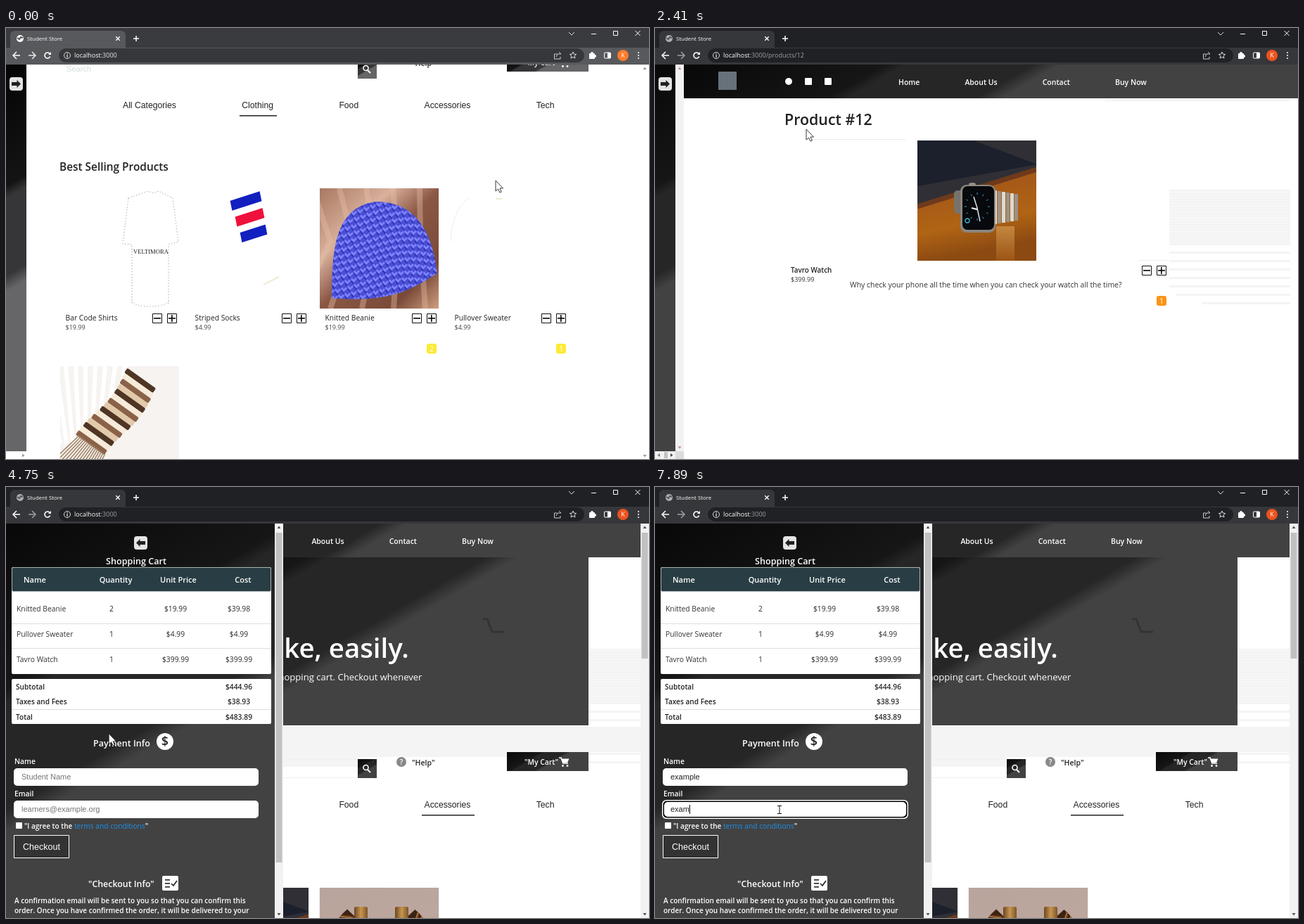
Animation, 914 px wide and 613 px high, one loop 8000 ms. Source, as an HTML page with a canvas:

```html
<!DOCTYPE html>
<html lang="en">
<head>
<meta charset="utf-8">
<title>Student Store</title>
<style>
html, body { margin: 0; width: 100%; height: 100%; overflow: hidden; background: #fff; }
canvas { display: block; width: 100vw; height: 100vh; }
</style>
</head>
<body>
<canvas id="stage" width="914" height="613"></canvas>
<script>
const ctx = document.getElementById('stage').getContext('2d');
const SANS = '"Open Sans", "Noto Sans", sans-serif';
const ARIAL = '"Liberation Sans", sans-serif';
const SERIF = '"Liberation Serif", serif';
const LOOP = 8000, SCROLL = 342;
const CLICK = { category: 420, product: 1170, add: 2140, home: 3190, cart: 3959, name: 5020, email: 7230 };

// Pointer journeys: start, end, destination, look on arrival
const JOURNEYS = [
  [60, 400, 642, 105, 'hand'], [620, 1020, 342, 333, 'hand'], [1170, 1710, 715, 341, 'hand'],
  [2080, 2410, 215, 144, 'arrow'], [2560, 3040, 355, 78, 'hand'], [3310, 3720, 15, 77, 'arrow'],
  [4210, 4870, 175, 411, 'beam'], [6900, 7230, 177, 459, 'beam']];
const CART = [['Knitted Beanie', '2', '$19.99', '$39.98'], ['Pullover Sweater', '1', '$4.99', '$4.99'],
  ['Tavro Watch', '1', '$399.99', '$399.99']];
const CLOTHES = [['Bar Code Shirts', '$19.99', shirt], ['Striped Socks', '$4.99', socks],
  ['Knitted Beanie', '$19.99', beanie, '2'], ['Pullover Sweater', '$4.99', sweater, '1'], ['', '', scarf]];
const ACCESSORIES = [['Matching Rings', '$200.00', rings], ['Tavro Watch', '$399.99', watch],
  ['Copper Bracelet', '$70.00', bracelet]];

const progress = (t, start, end) => Math.min(1, Math.max(0, (t - start) / (end - start)));
const smooth = k => k * k * (3 - 2 * k);
const typed = (word, t, start, end, bend) =>
  t < start ? '' : word.slice(0, 1 + Math.floor((word.length - 1) * progress(t, start, end) ** bend));

function box(x, y, w, h, fill, r = 0, stroke) {
  ctx.beginPath();
  ctx.roundRect(x, y, w, h, r);
  if (fill) { ctx.fillStyle = fill; ctx.fill(); }
  if (stroke) { ctx.strokeStyle = stroke; ctx.lineWidth = 1; ctx.stroke(); }
}
function trace(points) {
  ctx.beginPath();
  points.forEach(([x, y]) => ctx.lineTo(x, y));
}
function poly(points, fill) { trace(points); ctx.fillStyle = fill; ctx.fill(); }
function line(points, color, width = 1) {
  trace(points);
  ctx.strokeStyle = color; ctx.lineWidth = width; ctx.stroke();
}
function oval(x, y, rx, ry, fill, stroke, width = 1, a = 0, b = 2 * Math.PI, tilt = 0) {
  ctx.beginPath();
  ctx.ellipse(x, y, rx, ry, tilt, a, b);
  if (fill) { ctx.fillStyle = fill; ctx.fill(); }
  if (stroke) { ctx.strokeStyle = stroke; ctx.lineWidth = width; ctx.stroke(); }
}
// y is the middle of the capitals
function text(str, x, y, size, color = '#222', weight = 400, align = 'left', font = SANS) {
  ctx.font = `${weight} ${size}px ${font}`;
  ctx.textAlign = align;
  ctx.fillStyle = color;
  ctx.fillText(str, x, y + size * .36);
  return ctx.measureText(str).width;
}
function menu(labels, x, gap, ...style) {
  for (const label of labels) x += gap + text(label, x, ...style);
}
function within(x, y, w, h, dx, dy, draw) {
  ctx.save();
  ctx.beginPath(); ctx.rect(x, y, w, h); ctx.clip();
  ctx.translate(dx, dy);
  draw();
  ctx.restore();
}
function blend(x0, y0, x1, y1, ...stops) {
  const g = ctx.createLinearGradient(x0, y0, x1, y1);
  stops.forEach(([p, c]) => g.addColorStop(p, c));
  return g;
}
// Black to grey in diagonal bands
function dark(x, y, w, h, washed) {
  const len = w * .5 + h * .866;
  const [a, b, c, d] = washed ? ['#040404', '#141414', '#363638', '#666668']
    : ['#080808', '#161616', '#262626', '#424242'];
  box(x, y, w, h, blend(x, y, x + len * .5, y + len * .866,
    [0, a], [.3, b], [.33, c], [.52, c], [.56, d], [1, d]));
}
function cartIcon(x, y, color) {
  line([[x, y], [x + 3, y], [x + 6, y + 8], [x + 13, y + 8]], color, 1.7);
  poly([[x + 3, y + 1.5], [x + 14.5, y + 1.5], [x + 12, y + 7], [x + 6, y + 7]], color);
  for (const dx of [5.5, 12]) oval(x + dx, y + 11.5, 1.4, 1.4, color);
}

// Product pictures, drawn in a 170 x 171 box
function rings() {
  const glow = ctx.createRadialGradient(85, 110, 10, 85, 90, 115);
  glow.addColorStop(0, '#4a2c26'); glow.addColorStop(.6, '#26161a'); glow.addColorStop(1, '#0d080a');
  box(0, 0, 170, 171, glow);
  for (const [x, y, tilt] of [[63, 78, -.1], [102, 73, .45]]) {
    oval(x, y + 4, 24, 20, null, '#6b503c', 7, 0, 7, tilt);
    oval(x, y, 23, 19, null, '#c9ad91', 5, 0, 7, tilt);
    oval(x, y + 4, 25, 20, null, '#f4e6d2', 3, .6, 2.8, tilt);
  }
}
function watch() {
  box(0, 0, 170, 171, blend(0, 70, 20, 171, [0, '#a3561a'], [.6, '#b06414'], [1, '#8c4a12']));
  poly([[0, 0], [170, 0], [170, 38], [0, 92]], '#302f35');
  poly([[0, 0], [80, 0], [170, 34], [0, 65]], '#1b202c');
  line([[0, 94], [170, 41]], '#6e3a1b', 7);
  box(112, 122, 26, 49, blend(0, 122, 0, 171, [0, '#c4873f'], [1, '#9c5414']));
  box(52, 71, 14, 33, '#77736c', 5);
  for (let i = 0; i < 6; i++) box(108 + i * 6, 71 + i, 5, 48 - i * 2, i % 2 ? '#98938a' : '#dedad0', 1);
  box(61, 63, 50, 68, '#8b8780', 9);
  box(64, 65, 45, 62, '#07090d', 7);
  oval(78, 62, 5, 2, '#9a8f88');
  for (let i = 0; i < 12; i++) {
    const a = i * Math.PI / 6, c = Math.cos(a), s = Math.sin(a);
    line([[85 + c * 15, 94 + s * 17], [85 + c * 18, 94 + s * 20]], '#3f9fd0');
  }
  line([[80, 80], [85, 96], [89, 115]], '#d9e4e8', 1.5);
  line([[77, 96], [85, 98]], '#fff', 2);
  oval(71, 114, 3, 3, null, '#3fb6d0', 1.3);
}
function bracelet() {
  box(0, 0, 170, 171, blend(0, 0, 60, 171, [0, '#b9a49d'], [.6, '#bda79e'], [1, '#a38e89']));
  const p = (a, side) => {
    const spread = side * (13 + 10 * Math.max(0, Math.sin(a)));
    return [87 + Math.cos(a) * (56 + spread), 72 + Math.sin(a) * (44 + spread)];
  };
  for (let a = -.75; a < 3.9; a += .05) line([p(a, -1), p(a, 1)], '#3e2311', 6);
  for (let a = -.7; a < 3.8; a += .13) {
    line([p(a, -1), p(a + .16, 0), p(a, 1)], '#a9713f', 2.2);
    line([p(a + .05, -.9), p(a + .2, 0), p(a + .05, .9)], '#6b3d1c', 1.6);
  }
  for (const x of [49, 107]) box(x, 27, 19, 38, blend(x, 0, x + 19, 0, [0, '#6d4622'], [.5, '#c69650'], [1, '#7d5429']), 2);
}
function shirt() {
  ctx.setLineDash([1, 3]);
  line([[97, 14], [125, 4], [132, 7], [140, 4], [160, 14], [168, 76], [154, 80], [154, 165]], '#888');
  oval(128, 160, 26, 8, null, '#888', 1, 0, Math.PI);
  line([[102, 163], [102, 80], [89, 79], [97, 14]], '#888');
  ctx.setLineDash([]);
  text('VELTIMORA', 129, 90, 8.6, '#222', 400, 'center', SERIF);
}
function socks() {
  ['#1220bf', '#f0103c', '#1220bf'].forEach((color, i) => {
    ctx.save();
    ctx.translate(80 + i * 6, 18 + i * 23);
    ctx.transform(1, -.32, .2, 1, 0, 0);
    box(-21 + i, -7, 42 - i * 3, 14, color);
    ctx.restore();
  });
  line([[105, 137], [127, 126]], '#f1ead8', 2);
}
function beanie() {
  box(0, 0, 170, 171, blend(0, 0, 170, 171, [0, '#a87862'], [.3, '#d9b19c'], [.5, '#8b5745'], [.8, '#7a4a38'], [1, '#d0a080']));
  for (let i = 0; i < 6; i++) line([[-10 + i * 38, 0], [15 + i * 32, 75], [-30 + i * 45, 171]], '#e6bda566', 8);
  ctx.beginPath();
  ctx.moveTo(17, 156);
  ctx.bezierCurveTo(18, 95, 18, 25, 82, 19);
  ctx.bezierCurveTo(135, 20, 160, 60, 167, 121);
  ctx.bezierCurveTo(135, 140, 105, 164, 17, 156);
  ctx.fillStyle = '#4a4fd6'; ctx.fill();
  ctx.clip();
  for (let row = 0; row < 17; row++) for (let i = 0; i < 20; i++) {
    const x = i * 9 + (row % 2) * 4, y = 8 + row * 9.5 + 14 * Math.cos(x / 40);
    line([[x, y], [x + 3, y + 4], [x + 7, y]], '#7f84ff', 2.6);
    line([[x, y + 4], [x + 3, y + 8]], '#2f33a8', 1.8);
  }
}
function sweater() {
  oval(40, 80, 38, 70, null, '#eee', 1, 3.2, 4.4);
  line([[66, 15], [76, 15]], '#dcd9b0');
}
function scarf() {
  box(0, 0, 170, 171, '#f6f3f1');
  for (let i = 0; i < 9; i++) line([[i * 14 - 20, 0], [i * 9, 110]], '#fff', 6);
  const tones = ['#4f3524', '#f6ead8', '#8a6248', '#e2c9a9'];
  ctx.translate(120, 20);
  ctx.rotate(.62);
  for (let i = 0; i < 15; i++) box(-30 + 5 * Math.sin(i / 3), i * 8, 50, 8, tones[i % 4], 2);
  for (let i = 0; i < 16; i++) line([[-30 + i * 3, 118], [-38 + i * 4, 160]], '#a5876a', 1.6);
}

function browser(washed, path) {
  const grey = washed ? '#e8e8e8' : '#9aa0a6', bar = washed ? '#58595c' : '#36373a';
  box(0, 0, 914, 30, washed ? '#3a3b3e' : '#202124');
  box(6, 4, 164, 30, bar, 6);
  box(0, 28, 914, 24, bar);
  box(75, 29, 747, 20, washed ? '#36373a' : '#202124', 10);
  oval(20, 15, 5, 5, washed ? '#fff' : '#aab0b5');
  line([[16, 14], [19, 16], [21, 13], [24, 14]], '#55585c', 2);
  text('Student Store', 30, 15, 7.9, '#fff');
  const cross = (x, y, r, width) => {
    line([[x - r, y - r], [x + r, y + r]], '#fff', width);
    line([[x + r, y - r], [x - r, y + r]], '#fff', width);
  };
  cross(159, 15, 2.7, 1.3);
  cross(898, 7.5, 3.5, 1);
  box(181, 14.3, 8, 1.5, '#fff'); box(184.3, 11, 1.5, 8, '#fff');
  line([[800, 6], [804, 10], [808, 6]], '#ddd');
  box(832, 8, 7, 1, '#fff');
  box(863.5, 4.5, 6, 6, null, 0, '#fff');
  for (const [x, d, c] of [[15, 1, '#fff'], [37, -1, grey]]) {
    line([[x - 5 * d, 39], [x + 5 * d, 39]], c, 1.5);
    line([[x, 34], [x - 5 * d, 39], [x, 44]], c, 1.5);
  }
  oval(59, 39, 4, 4, null, '#fff', 1.6, .4, 5.7);
  poly([[60, 38], [64, 38], [64, 34]], '#fff');
  oval(87, 39, 4.5, 4.5, null, '#ddd');
  box(86.4, 38, 1.3, 4, '#ddd'); box(86.4, 36, 1.3, 1.3, '#ddd');
  const host = text('localhost', 97, 39, 9, '#fff');
  text(':3000' + path, 97 + host, 39, 9, grey);
  line([[783, 37], [779.5, 37], [779.5, 44], [788, 44], [788, 41]], '#ccc');
  line([[782, 41], [784, 37], [789, 37], [786, 34]], '#ccc');
  line(Array.from({ length: 11 }, (_, i) => {
    const r = i % 2 ? 2.3 : 5, a = i * Math.PI / 5 - Math.PI / 2;
    return [806 + r * Math.cos(a), 39 + r * Math.sin(a)];
  }), '#ddd');
  box(829, 36, 8, 8, '#fff', 1); oval(833, 36, 2, 2, '#fff'); oval(837, 40, 2, 2, '#fff');
  box(850.5, 35, 9, 8, null, 1, '#fff'); box(855, 35, 4, 8, '#fff');
  oval(877, 39, 8, 8, washed ? '#ff7a2a' : '#ed531f');
  text('K', 877, 39, 9, '#fff', 400, 'center');
  for (const y of [35, 39, 43]) oval(899, y, 1, 1, '#fff');
}
function tip(x, y, dx, dy, color) {
  poly([[x + dx * 2.5, y + dy * 2.5], [x - dx - dy * 2.5, y - dy - dx * 2.5], [x - dx + dy * 2.5, y - dy + dx * 2.5]], color);
}
function scrollbar(x, bottom, top, end) {
  box(x, 52, 12, bottom - 52, '#f3f2f2');
  if (end) box(x + 1.5, top, 9, end - top, '#c1c1c1');
  tip(x + 6, 58, 0, -1, end ? '#505050' : '#b99');
  tip(x + 6, bottom - 6, 0, 1, end ? '#505050' : '#b99');
}
function navBar(shift, right) {
  dark(41, 52, right - 41, 48);
  box(84 + shift, 62, 26, 26, '#66717a');
  oval(184 + shift, 76, 5, 5, '#fff');
  for (const x of [207, 235]) box(x + shift, 71, 10, 10, '#fff', 1);
  menu(['Home', 'About Us', 'Contact', 'Buy Now'], 340 + shift, 64, 77, 10.5, '#fff', 600);
}
function stepper(x, y, count, color) {
  for (const dx of [0, 21]) {
    box(x + dx + .5, y + .5, 13, 13, '#fff', 0, '#111');
    box(x + dx + 2, y + 6, 10, 1.7, '#111');
  }
  box(x + 27, y + 2, 1.7, 10, '#111');
  if (count) {
    box(x + 21, y + 43, 14, 14, color, 3);
    text(count, x + 28, y + 50, 10.5, '#fff', 400, 'center');
  }
}
function paleBands(left) {
  for (let y = 230; y < 400; y += y < 306 ? 4 : 12) {
    const x = Math.max(left, 632 + (y - 300) ** 2 / 56);
    box(x, y, 903 - x, y < 306 ? 3.5 : 3, '#f4f4f4');
  }
}
function storeHead() {
  paleBands(828);
  box(184, 341, 719, 36, '#f4f4f4');
  box(184, 341, 528, 43, '#f4f4f4');
  box(184, 341, 316, 57, '#f4f4f4');
  dark(76, 100, 752, 239);
  line([[678, 188], [684, 188], [691, 206], [708, 206]], '#333', 3);
  text('Welcome!', 103, 174, 38.4, '#fff', 600);
  text('Find what you like, easily.', 103, 229, 38.4, '#fff', 600);
  text('Look for things you like to start filling up your shopping cart. Checkout whenever', 103, 270, 13.05, '#fff');
  text("you're ready.", 103, 288.5, 13.05, '#fff');
}
function storeAbout() {
  box(76, 823, 827, 300, '#f4f4f4');
  box(827, 913, 76, 200, '#fff');
  text('About', 76, 882, 15.6, '#222', 600);
  text('The student store offers great products at great prices to all', 100, 956, 10.4, '#555');
  dark(476, 913, 351, 200);
}
function store(washed, scroll, items, t) {
  within(29, 52, 885, 561, 0, -scroll, () => {
    if (!scroll) storeHead();
    else if (!washed) {
      ctx.save(); ctx.translate(0, scroll);
      paleBands(632);
      ctx.restore();
    }
    if (!washed) {
      box(76.5, 387.5, 424, 26, null, 4, '#f0f0f0');
      for (const y of [450, 454, 458]) box(78, y, 12, 1, '#777');
      oval(562, 391, 7, 7, '#888');
      text('?', 562, 391, 10, '#fff', 600, 'center');
    }
    text('Search', 86, 400.5, 11.1, washed ? '#cfdcd8' : '#777', 400, 'left', ARIAL);
    dark(500, 387, 27, 27, washed);
    oval(511.5, 399, 3.5, 3.5, null, '#fff', 1.6); line([[514, 402], [518, 406]], '#fff', 2);
    text('"Help"', 577, 392, 10.5, '#222', 600);
    dark(712, 377, 116, 27, washed);
    text('"My Cart"', 737, 391.5, 10.3, '#fff', 600);
    cartIcon(786, 385, '#fff');
    menu(['All Categories', 'Clothing', 'Food', 'Accessories', 'Tech'], 166, 93.4, 451.5, 12.2, '#222', 400, 'left', ARIAL);
    const settled = t >= CLICK.category + 240;
    if (!settled) box(332, 466, 53, 1.5, '#222');
    if (!washed) box(591, 466, 75, 1.5, settled ? '#222' : '#a8938f');
    text('Best Selling Products', 76, 539, 15.4, '#222', 600);
    items.forEach(([label, price, picture, count], i) => {
      const x = Math.round(76.6 + (i % 4) * 184.6), y = 570 + Math.floor(i / 4) * 253;
      if (!washed) box(x - .5, y, 170, 238.5, '#fff', 0, '#f2f2f2');
      within(x, y, 169, 171, x, y, picture);
      if (!label) return;
      text(label, x + 7.5, y + 184, washed ? 10.3 : 9.9, '#222', washed ? 400 : 600);
      text(price, x + 7.5, y + 197.5, 9, '#444');
      stepper(x + 131, y + 178, count, '#fdea35');
    });
    if (!washed && scroll) storeAbout();
  });
}
function productPage(t) {
  paleBands(731);
  navBar(6, 914);
  box(216, 158, 140, 1, '#ebebeb'); box(640, 103, 262, 1, '#efefef'); box(687, 330, 43, 1, '#eee');
  text('Product #12', 184, 130.5, 21.4, '#222', 600);
  within(373, 160, 169, 171, 373, 160, watch);
  text('Tavro Watch', 193, 344, 9.9, '#222', 600);
  text('$399.99', 193, 357.5, 9, '#333');
  stepper(692, 338, t >= CLICK.add && '1', '#fb9416');
  text('Why check your phone all the time when you can check your watch all the time?', 277, 365, 10.45, '#333');
}

function arrowButton(x, dir) {
  box(x - 9, 70, 19, 19, '#e4e4e4', 4);
  box(x - (dir > 0 ? 6 : 1), 77, 8, 5, '#222');
  poly([[x + .5 + 6.5 * dir, 79.5], [x + .5 + dir, 74], [x + .5 + dir, 85]], '#222');
}
function field(y, w, value, hint, focus, caret) {
  if (focus) { box(10, y - 1, w + 2, 27, '#fff', 6); box(11.5, y + .5, w - 1, 24, '#000', 5); }
  box(focus ? 13 : 11, y + (focus ? 2 : 0), w - (focus ? 4 : 0), focus ? 21 : 25, '#fff', 5);
  const width = text(value || hint, 22, y + 12, 11, value ? '#222' : '#757575', 400, 'left', ARIAL);
  if (focus && caret) box(22 + (value ? width : 0), y + 6, 1, 13, '#000');
}
function suggestions(y, w, items) {
  box(79, y, w, items.length * 31, '#282a2e', 3);
  items.forEach((item, i) => text(item, 87, y + 15.5 + i * 31, 8.4, '#f2f2f2'));
}
function sidebar(open, t) {
  const w = 29 + open * 353, wide = open > .9, narrow = open < .1, washed = t < CLICK.category;
  const bottom = wide ? 613 : 602;
  within(0, 52, w, bottom - 52, 0, 0, () => {
    dark(0, 52, w, 561, washed);
    arrowButton(Math.floor(w / 2), narrow ? 1 : -1);
    if (!narrow) cartPanel(wide, t);
  });
  if (washed) { box(0, 602, 41, 11, '#fff'); tip(24, 608, 1, 0, '#999'); return; }
  scrollbar(w, bottom, 65, narrow ? 0 : wide ? 534 : 481);
  if (wide) return;
  box(0, 602, w, 11, '#f1f1f1');
  box(13, 603, narrow ? 5 : w - 29, 9, '#c1c1c1');
  tip(6, 607.5, -1, 0, '#777'); tip(w - 6, 607.5, 1, 0, '#444');
  box(w, 602, 12, 11, '#dcdcdc');
}
function cartPanel(wide, t) {
  const white = (s, x, y, size = 10.3, align) => text(s, x, y, size, '#fff', 600, align);
  const center = (s, x, y, weight) => text(s, x, y, 10.3, '#2a2a2a', weight, 'center');
  const wrap = (s, y, draw) => wide ? draw(s, y) : s.split(' ').forEach((word, i) => draw(word, y + i * 14.5));
  const tableW = wide ? 369 : 300, rowH = wide ? 35.7 : 50, drop = wide ? 0 : 43;
  const [qty, unit, cost] = wide ? [150, 241, 331] : [82, 127, 172];
  white('Shopping Cart', wide ? 185 : 94.5, 105, 12.6, 'center');
  box(8, 114, tableW, 152 + drop, '#fff', 2);
  box(8.5, 114.5, tableW - 1, 34, '#293e44', 2, '#a9b3b6');
  white('Name', 25, 132, 11);
  white('Quantity', qty + 6, 132, 11, 'center');
  wrap('Unit Price', wide ? 132 : 125, (s, y) => white(s, unit + (wide ? 4 : 8), y, 11, 'center'));
  white('Cost', cost + 6, 132, 11, 'center');
  CART.forEach(([name, n, price, total], i) => {
    const y = 173.5 + i * rowH;
    wrap(name, y, (s, rowY) => text(s, 15, rowY, 10.3, '#333'));
    center(n, qty, y); center(price, unit, y); center(total, cost, y);
    if (i) box(8, Math.round(y - (wide ? 15.5 : 15.5)), tableW, 1, '#ddd');
  });
  const sumY = 273 + drop, totalY = sumY + (wide ? 54 : 69);
  box(8, sumY, tableW, totalY + 10 - sumY, '#fff', 2);
  box(8, totalY - 11, tableW, 1, '#ddd');
  const label = (s, y) => text(s, 14, y, 10.1, '#222', 600);
  label('Subtotal', sumY + 11); center('$444.96', cost, sumY + 11, 600);
  if (wide) label('Taxes and Fees', 305.5);
  else { label('Taxes', 349); label('and Fees', 363); }
  center('$38.93', cost, sumY + (wide ? 32.5 : 40), 600);
  label('Total', totalY); center('$483.89', cost, totalY, 600);

  const y = wide ? 0 : 57, middle = wide ? 0 : -91, fieldW = wide ? 348 : 167;
  const focusEmail = t >= CLICK.email, focusName = t >= CLICK.name && !focusEmail;
  white('Payment Info', 124 + middle, 364 + y, 12.5);
  oval(226 + middle, 362 + y, 12, 12, '#fff');
  text('$', 226 + middle, 362 + y, 18, '#222', 600, 'center');
  const name = typed('example', t, 5860, 6560, 1.5), email = typed('exam', t, 7470, 7890, 1);
  white('Name', 12, 390.5 + y);
  field(400 + y, fieldW, name, 'Student Name', focusName, name || t < 5550);
  white('Email', 12, 436.5 + y);
  field(446 + y, fieldW, email, 'learners@example.org', focusEmail, true);
  box(14, 477 + y, 9, 9, '#fff', 1);
  const link = 26 + text('"I agree to the ', 26, 482 + y, 10, '#fff', 600);
  const end = link + text(wide ? 'terms and conditions' : 'terms and', link, 482 + y, 10.2, '#1e90e8');
  if (wide) white('"', end, 482);
  else white('"', 12 + text('conditions', 12, 553.5, 10.2, '#1e90e8'), 553.5);
  const buttonY = wide ? 495.5 : 567.5;
  box(11.5, buttonY, 78, 32, '#333', 0, '#fff');
  text('Checkout', 50.5, buttonY + 15.5, 12.5, '#fff', 400, 'center', ARIAL);
  if (!wide) return;
  white('"Checkout Info"', 117, 565, 12.4);
  box(222, 553, 23, 21, '#fff', 2);
  for (const dy of [558, 563, 568]) box(226, dy, 7, 1.6, '#222');
  line([[235, 564], [238, 567], [243, 560]], '#222', 1.6);
  ['A confirmation email will be sent to you so that you can confirm this',
    'order. Once you have confirmed the order, it will be delivered to your', 'dorm room.']
    .forEach((s, i) => white(s, 12, 588 + i * 14.5, 10));
  const saved = ['Experience', 'Example', 'Student', 'Shopper', 'Customer'];
  const mails = ['exam', 'shop', 'mail', 'test', 'user'].map(s => s + '@example.org');
  if (focusName && name !== 'example') {
    if (name) suggestions(431, 66, [saved[name.length < 3 ? 0 : 1]]);
    else suggestions(431, 116, saved);
  }
  if (focusEmail && email !== 'exam') {
    if (email) suggestions(477, 115, [mails[0]]);
    else suggestions(287, 115, mails);
  }
}

function pointer(t) {
  let x = 696, y = 217, look = 'arrow';
  for (const [start, end, toX, toY, arrival] of JOURNEYS) {
    const k = progress(t, start, end);
    x += (toX - x) * k;
    y += (toY - y) * k;
    if (k) look = k < 1 ? 'arrow' : arrival;
  }
  ctx.save();
  ctx.translate(x, y);
  if (look === 'beam') {
    box(-.5, -5, 1, 10, '#111');
    for (const end of [-6, 5]) box(-3, end, 6, 1, '#111');
  } else if (look === 'arrow') {
    const shape = [[0, 0], [0, 15], [3.5, 12], [6, 17], [8.3, 16], [6, 11], [10.5, 11], [0, 0]];
    poly(shape, '#fff');
    line(shape, '#222', .9);
  } else {
    box(2.5, .5, 4, 14, '#fff', 2, '#222');
    box(1, 8, 14, 12, '#fff', [2, 3, 5, 5], '#222');
    line([[3, 14], [-2, 10], [3, 17]], '#222');
    box(3, 3, 3, 9, '#fff');
    for (const dx of [9, 12]) box(dx, 8, 1, 4, '#222');
  }
  ctx.restore();
}

function render(t) {
  const washed = t < CLICK.category, home = t >= CLICK.home;
  const product = t >= CLICK.product && !home;
  box(0, 0, 914, 613, '#fff');
  if (product) productPage(t);
  else {
    store(washed, home ? 0 : SCROLL, washed ? CLOTHES : ACCESSORIES, t);
    if (home) navBar(0, 903);
    if (!washed) scrollbar(902, 613, home ? 65 : 172, home ? 244 : 352);
    else { tip(908, 58, 0, -1, '#999'); tip(908, 608, 0, 1, '#999'); }
  }
  sidebar(smooth(progress(t, CLICK.cart, CLICK.cart + 280)), t);
  browser(washed, product ? '/products/12' : '');
  if (home && t < CLICK.home + 240) {
    box(0, 600, 60, 14, '#35363a', 2);
    text('localhost:3000', 3, 607, 7.8, '#fff');
  }
  pointer(t);
}
function tick(now) {
  render(now % LOOP);
  requestAnimationFrame(tick);
}
requestAnimationFrame(tick);
</script>
</body>
</html>
```
